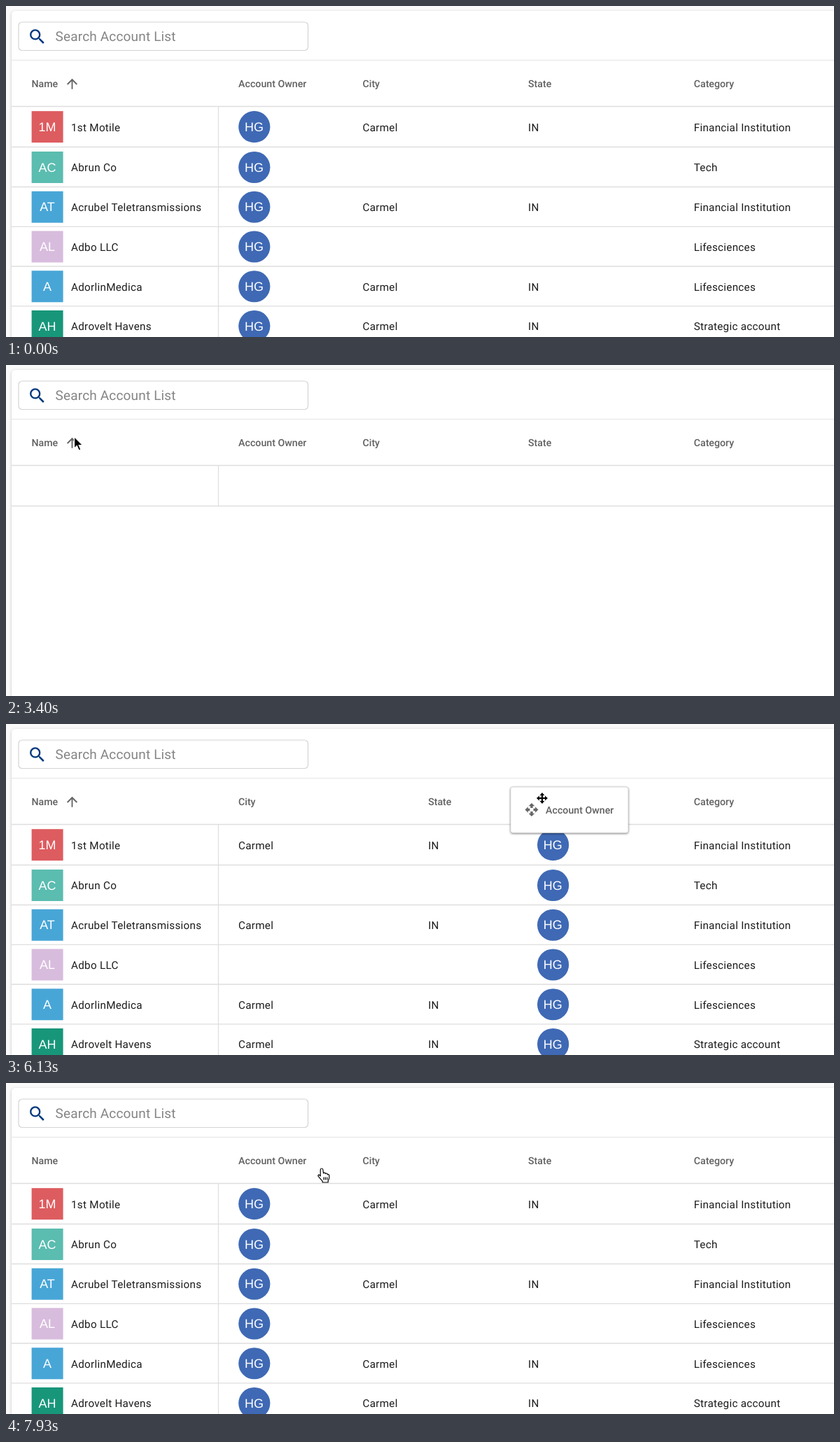
These frames come from a looping animation (1183 px wide and 473 px high, 8000 ms). An HTML page:

```html
<!DOCTYPE html>
<html lang="en">
<head>
<meta charset="utf-8">
<title>Account list</title>
<style>
  html, body { margin: 0; width: 100%; height: 100%; overflow: hidden; background: #fafafa; }
  body { position: relative; }
  .card {
    position: absolute; inset: 7px 0 0 8px; background: #fff; border-radius: 5px 0 0 0;
    box-shadow: 0 2px 1px -1px #0003, 0 1px 1px #0002, 0 1px 4px #0003;
  }
  svg { position: absolute; inset: 0; width: 100%; height: 100%; overflow: hidden; }
  text { font: 15.25px Roboto, sans-serif; letter-spacing: .0179em; fill: #1d1d1d; text-rendering: geometricPrecision; }
  .head { font-size: 14.2px; font-weight: 500; letter-spacing: 0; fill: #616161; }
  .hint { font-size: 19px; letter-spacing: .009em; fill: #858585; }
  .badge { font: 18px "Liberation Sans", Arial, sans-serif; letter-spacing: 0; fill: #fff; text-anchor: middle; }
  .line { stroke: #dedede; stroke-width: 1.3; }
  .icon { fill: #666; }
  .preview { fill: #fff; stroke: #d0d0d0; stroke-width: .8; filter: drop-shadow(0 1.5px 1.5px #0007); }
</style>
</head>
<body>
<div class="card"></div>
<svg viewBox="0 0 1183 473">
  <rect x="18" y="23" width="413.5" height="40.5" rx="5" fill="#fff" stroke="#d4d4d4" stroke-width="1.2"/>
  <path fill="#04387c" transform="translate(30.5 29.7) scale(1.18)" d="M15.5 14h-.79l-.28-.27A6.47 6.47 0 0 0 16 9.5 6.5 6.5 0 1 0 9.5 16c1.61 0 3.09-.59 4.23-1.57l.27.28v.79l5 4.99L20.49 19zm-6 0a4.5 4.5 0 1 1 0-9 4.5 4.5 0 0 1 0 9z"/>
  <text class="hint" x="70.5" y="50">Search Account List</text>
  <path class="line" d="M8 77.5H1183" style="stroke:#ebebeb"/>
  <path class="line" d="M8 143.5H1183M8 201.5H1183M303.5 144V201"/>
  <path id="rowLines" class="line" d="M8 258.5H1183M8 315.3H1183M8 372H1183M8 428.8H1183M303.5 202V473"/>
  <text class="head" x="36.5" y="116">Name</text>
  <g id="sort" class="icon"><path transform="scale(.94) translate(-12 -12)" d="M4 12l1.41 1.41L11 7.83V20h2V7.83l5.58 5.59L20 12l-8-8z"/></g>
  <g id="table"></g>
  <g id="preview">
    <rect class="preview" width="168" height="65.5" rx="3"/>
    <path class="icon" transform="translate(30 32.5) scale(.86) translate(-12 -12)" d="M10 9h4V6h3l-5-5-5 5h3zm-1 1H6V7l-5 5 5 5v-3h3zm14 2l-5-5v3h-3v4h3v3zm-9 3h-4v3H7l5 5 5-5h-3z"/>
    <text class="head" x="50" y="38">Account Owner</text>
  </g>
  <path id="arrow" fill="#000" stroke="#fff" stroke-width="1.2" d="M0 0V16.5L3.8 13 6.6 19.6 9.5 18.4 6.7 12H12z"/>
  <path id="hand" fill="#fff" stroke="#000" stroke-width="1.2" stroke-linejoin="round" d="M-1.8 10.5V1.5Q-1.6 -.5 0 -.5 1.6 -.5 1.9 1.5L2.5 6.5Q3.2 5 4.8 5.8L5.3 7.2Q6.6 5.8 8 7.2L8.3 8.4Q10.6 7.4 10.8 10V13Q10.6 15 9.2 17V19.5H1.2V17.8L-4.6 11.2Q-5.8 9 -4 8.6-2.8 8.8-1.8 10.5zM3 12V16M5.4 12V16M7.8 12V16"/>
  <path id="move" fill="#000" stroke="#fff" stroke-width="2" paint-order="stroke" d="M0-8L3.4-4H1V-1H4V-3.4L8 0 4 3.4V1H1V4H3.4L0 8-3.4 4H-1V1H-4V3.4L-8 0-4-3.4V-1H-1V-4H-3.4z"/>
</svg>
<script>
const LOOP = 8000;
const FPS = 15;
const $ = id => document.getElementById(id);
const show = (node, on) => node.style.display = on ? '' : 'none';
const place = (node, x, y = 0) => node.setAttribute('transform', `translate(${x} ${y})`);

function add(parent, tag, attrs = {}, content = '') {
  const node = document.createElementNS('http://www.w3.org/2000/svg', tag);
  for (const key in attrs) node.setAttribute(key, attrs[key]);
  node.textContent = content;
  return parent.appendChild(node);
}

// initials, colour, name, city, state, category
const lists = {
  up: [
    ['1M', '#dd5c5f', '1st Motile', 'Carmel', 'IN', 'Financial Institution'],
    ['AC', '#5bbcb0', 'Abrun Co', '', '', 'Tech'],
    ['AT', '#48a6d7', 'Acrubel Teletransmissions', 'Carmel', 'IN', 'Financial Institution'],
    ['AL', '#d8bcdd', 'Adbo LLC', '', '', 'Lifesciences'],
    ['A', '#48a6d7', 'AdorlinMedica', 'Carmel', 'IN', 'Lifesciences'],
    ['AH', '#18967a', 'Adrovelt Havens', 'Carmel', 'IN', 'Strategic account']
  ],
  down: [
    ['Z', '#5a7393', 'zPalvon', '', '', 'Lifesciences'],
    ['Z', '#b52d24', 'Zub48K', 'CARMEL', 'Indiana', 'Lifesciences'],
    ['ZI', '#20659f', 'Zorvane Inc', '', '', 'Client'],
    ['Z', '#f09c93', 'ZolkFirm', 'Carmel', 'IN', 'Financial Institution'],
    ['ZT', '#ed6c30', 'Zelu Tiles', 'Carmel', 'IN', 'Financial Institution'],
    ['ZMS', '#f9b432', 'Zal Marine Surveys', '', '', 'New business']
  ]
};

const bodies = { up: [], down: [] };
const newBody = (parent, key) => {
  const group = add(parent, 'g');
  bodies[key].push(group);
  return group;
};
const rowY = i => i ? 230.5 + (i - 1) * 56.75 : 172.7;

for (const key in lists) {
  const group = newBody($('table'), key);
  lists[key].forEach(([initials, fill, name], i) => {
    const y = rowY(i);
    add(group, 'rect', { x: 36.6, y: y - 22.5, width: 45, height: 45, fill });
    add(group, 'text', { class: 'badge', x: 59, y: y + 6 }, initials);
    add(group, 'text', { x: 93, y: y + 5.8 }, name);
  });
}

const columns = ['Account Owner', 'City', 'State', 'Category'].map((title, c) => {
  const column = add($('table'), 'g');
  const head = add(column, 'text', { class: 'head', y: 116 }, title);
  for (const key in lists) {
    const group = newBody(column, key);
    lists[key].forEach((row, i) => {
      const y = rowY(i);
      if (c) return add(group, 'text', { y: y + 5.8 }, row[c + 2]);
      add(group, 'circle', { cx: 22.8, cy: y, r: 22.6, fill: '#3f69b4' });
      add(group, 'text', { class: 'badge', x: 22.5, y: y + 6 }, 'HG');
    });
  }
  return { column, head };
});

// Left edges of owner, city, state for each slot the owner column can take
const slots = [[332, 509.5, 746], [568.5, 332, 746], [805, 332, 568.5]];
// time, slot before, slot after
const swaps = [[5410, 0, 1], [6025, 1, 2], [6500, 2, 1], [7080, 1, 0]];

function columnX(c, t) {
  if (c === 3) return 982.7;
  const swap = swaps.findLast(s => t >= s[0]);
  if (!swap) return slots[0][c];
  const [start, from, to] = swap;
  const eased = 1 - (1 - Math.min(1, (t - start) / 250)) ** 3;
  return slots[from][c] + (slots[to][c] - slots[from][c]) * eased;
}

// time, x, y
const path = [
  [870, 230, -18], [1300, 150, 50], [1670, 97.5, 102.5], [3870, 97.5, 102.5],
  [4130, 210, 108], [4470, 346.5, 113], [4670, 349, 113], [4870, 349, 113],
  [5130, 385, 112], [5420, 483, 109], [5600, 544, 108], [5670, 554, 106],
  [5830, 600, 102], [6025, 735, 105], [6055, 766, 106], [6470, 766, 106],
  [6750, 690, 91], [7000, 564, 113], [7070, 522, 121], [7270, 453, 128],
  [7330, 453, 128], [7670, 451, 122.5]
];

function pointer(t) {
  const next = path.findIndex(p => p[0] > t);
  if (next < 1) return path.at(next).slice(1);
  const [t0, x0, y0] = path[next - 1], [t1, x1, y1] = path[next];
  const k = (t - t0) / (t1 - t0);
  return [x0 + (x1 - x0) * k, y0 + (y1 - y0) * k];
}

function listAt(t) {
  if (t < 1730) return 'up';
  if (t < 2530) return '';
  if (t < 3400) return 'down';
  if (t < 3670) return '';
  return t >= 7330 && t < 7870 ? '' : 'up';
}

function cursorAt(t) {
  if (t < 870) return '';
  if (t < 3930) return 'arrow';
  return t >= 4870 && t < 7330 ? 'move' : 'hand';
}

function draw(t) {
  const list = listAt(t), dragging = t >= 4870 && t < 7330;
  for (const key in bodies) bodies[key].forEach(group => show(group, key === list));
  show($('rowLines'), list);

  const turn = t < 3400 ? 180 * Math.max(0, Math.min(1, (t - 1730) / 225)) : 0;
  $('sort').setAttribute('transform', `translate(94.5 111.3) rotate(${turn})`);
  show($('sort'), t < 7330);

  columns.forEach(({ column }, c) => place(column, columnX(c, t)));
  show(columns[0].head, !dragging);

  // The dragged header trails the pointer slightly
  const [px, py] = pointer(t - 70);
  show($('preview'), dragging);
  place($('preview'), px - 45, py - 16);

  const cursor = cursorAt(t);
  for (const id of ['arrow', 'hand', 'move']) {
    show($(id), id === cursor);
    place($(id), ...pointer(t));
  }
}

function tick() {
  const step = Math.floor(performance.now() % LOOP / 1000 * FPS + .1);
  draw(Math.round(step * 100 / FPS) * 10 % LOOP);
  requestAnimationFrame(tick);
}
tick();
</script>
</body>
</html>
```
